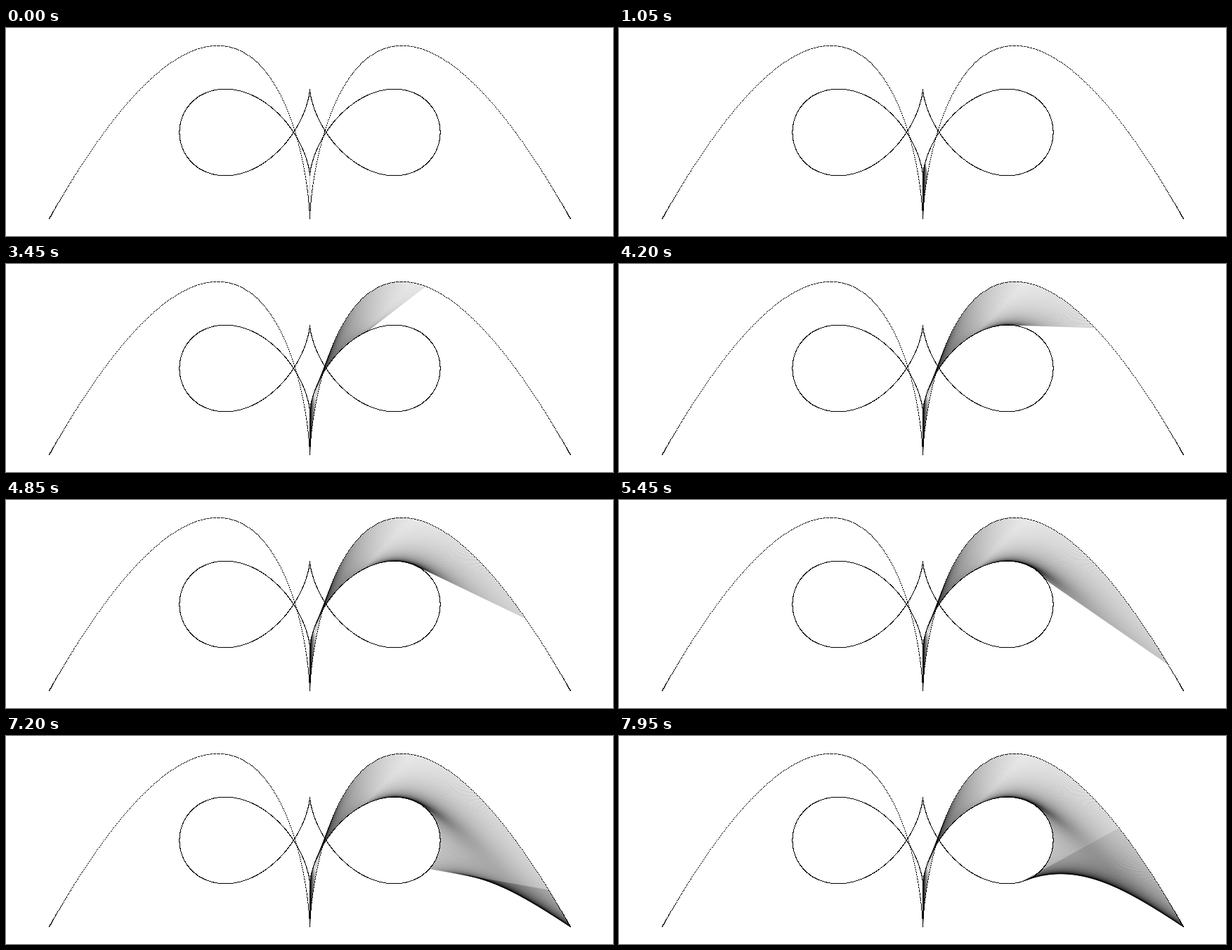
Animation of 864x297 px, one loop 8000 ms. Source, as an HTML page with a canvas:

```html
<!DOCTYPE html>
<html lang="en">
<head>
<meta charset="utf-8">
<title>Ruled surface between two curves</title>
<style>
  html, body { margin: 0; width: 100%; height: 100%; overflow: hidden; background: #fff; }
  canvas { position: absolute; left: 0; top: 0; }
</style>
</head>
<body>
<canvas id="shade" width="864" height="297"></canvas>
<canvas id="curves" width="864" height="297"></canvas>
<script>
const LOOP = 8000, FRAME = 50;
const STEPS = 2000;           // samples per full turn
const STEPS_PER_FRAME = 4;
const UNIT = 61.85, CX = 432, CY = 148.5;

const shade = document.getElementById('shade').getContext('2d');
const curves = document.getElementById('curves').getContext('2d');

const angle = step => step * 2 * Math.PI / STEPS;

function point(size, freq, t) {
  return [CX + 3 * size * UNIT * Math.sin(t) ** 3, CY + size * UNIT * Math.cos(freq * t)];
}
const inner = t => point(1, 3, t);
const outer = t => point(2, 4, t);

function plotCurves() {
  for (let step = 0; step < STEPS; step++) {
    for (const curve of [inner, outer]) {
      const [x, y] = curve(angle(step));
      curves.fillRect(Math.round(x), Math.round(y), 1, 1);
    }
  }
}

function drawRuling(step) {
  const t = angle(step);
  const [x1, y1] = inner(t), [x2, y2] = outer(t);
  const dx = x2 - x1, dy = y2 - y1;
  // one pixel of ink per row or column, whatever the slope
  shade.lineWidth = Math.max(Math.abs(dx), Math.abs(dy)) / Math.hypot(dx, dy);
  shade.beginPath();
  shade.moveTo(x1 + 0.5, y1 + 0.5);
  shade.lineTo(x2 + 0.5, y2 + 0.5);
  shade.stroke();
}

let nextStep = 0;

function render(time) {
  const frame = Math.floor((time % LOOP) / FRAME);
  const last = frame * STEPS_PER_FRAME;
  if (nextStep > last + 1) {
    shade.clearRect(0, 0, 864, 297);
    nextStep = 0;
  }
  while (nextStep <= last) drawRuling(nextStep++);
}

shade.strokeStyle = 'rgba(0, 0, 0, 0.2)';
plotCurves();
const start = performance.now();
function tick() {
  render(performance.now() - start);
  requestAnimationFrame(tick);
}
tick();
</script>
</body>
</html>
```
